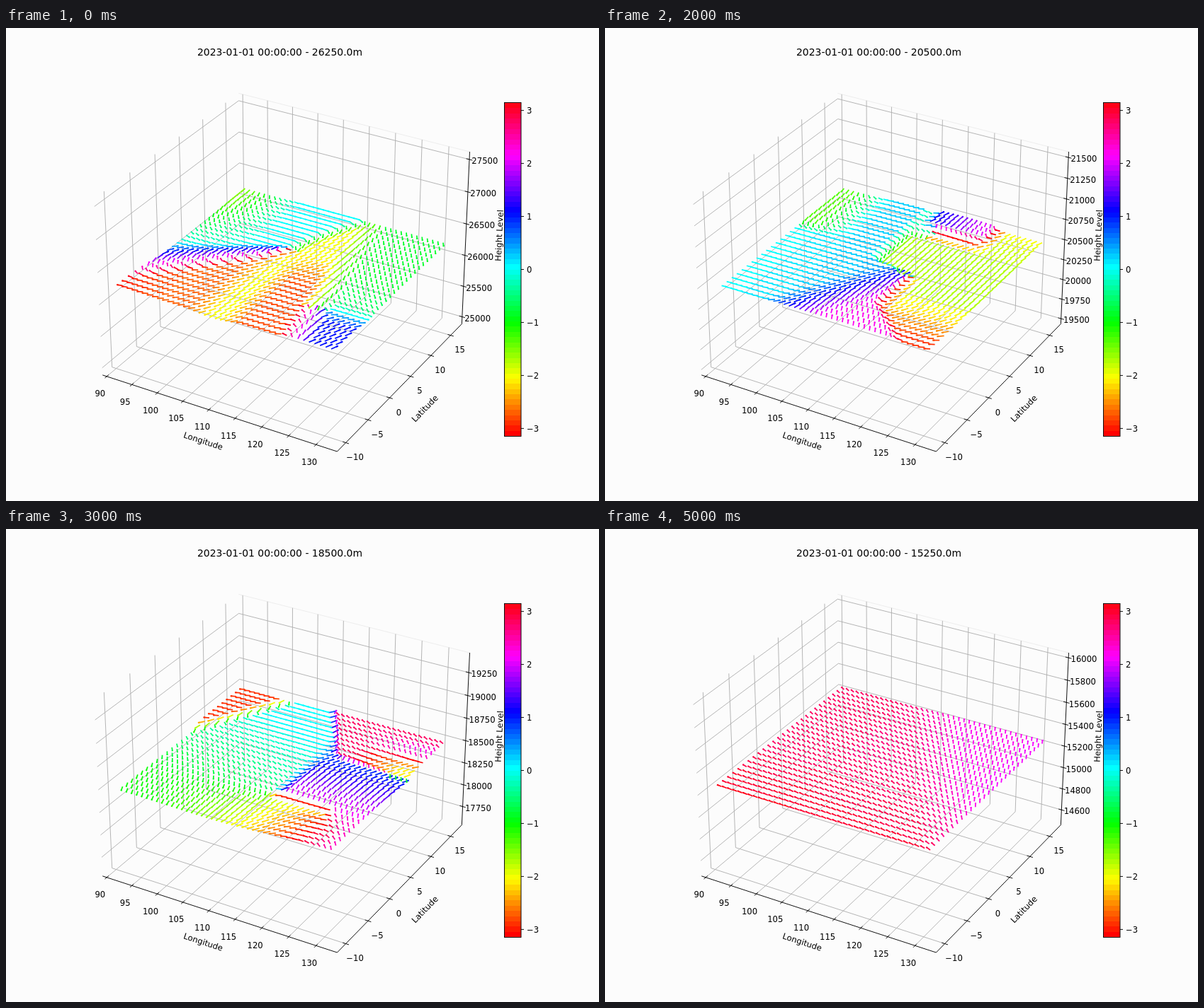
Recreate the animation shown at these times as an HTML page with a canvas. Size 837 px wide and 669 px high, loop 6000 ms.

```html
<!DOCTYPE html>
<html lang="en">
<head>
<meta charset="utf-8">
<title>Wind direction by height</title>
<style>
html, body { margin: 0; width: 100%; height: 100%; overflow: hidden; background: #fcfcfc; }
canvas { display: block; }
</style>
</head>
<body>
<canvas id="view" width="837" height="669"></canvas>
<script>
const ctx = document.getElementById('view').getContext('2d');
const FONT = '"DejaVu Sans", sans-serif';
const GRID = '#b0b0b0', INK = '#000', THIN = 0.93, SIZE = 11.62;

// Box half sizes, perspective scale and screen centre
const A = 0.5952, B = 0.4464, K = 3187, CX = 394.5, CY = 333.5;
// Data range and the share of it that the padded axes cover
const LON = [92, 131], LAT = [-10, 16], PAD = 1.1 * 25 / 24;

const ramp = (x, lo, hi) => Math.min(1, Math.max(0, (x - lo) / (hi - lo)));
const fall = (x, lo, hi) => 1 - ramp(x, lo, hi);
const mix = (a, b, k) => a + (b - a) * k;
const bump = (x, y) => Math.exp(-x * x - y * y);
// Blend two bearings along the shorter arc
const turn = (a, b, k) => a + k * Math.atan2(Math.sin(b - a), Math.cos(b - a));

// Bearing in radians at s (west to east) and t (south to north), both 0 to 1
function wind26(s, t) {
  const north = -1.5 * ramp(t, 0.42, 0.9) * fall(s, 0.02, 0.27);
  const south = 3.3 + 0.3 * ramp(s, 0, 0.25);
  const reach = Math.max(0.05, 0.33 - 0.55 * s);
  const west = mix(south, north, ramp(t - 0.38 - 0.5 * s, -reach, 0.06));
  const split = 0.4 + 0.22 * t ** 3;
  let a = turn(west, -2.05, ramp(s, split - 0.05, split + 0.05));
  a = turn(a, -2.8, ramp(s, 0.5, 0.6) * fall(t, 0.4, 0.65));
  const east = mix(1.05, -0.55, ramp(t, 0.15, 0.35)) - 0.3 * ramp(t, 0.3, 0.6);
  const edge = 0.83 - 0.17 * t;
  return turn(a, east, ramp(s, edge - 0.06, edge + 0.06));
}

function wind23(s, t) {
  const limit = 0.1 + 0.5 * s;
  const blue = 1.05 * ramp(s, -0.1, 0.15) * fall(t, limit - 0.1, limit) * fall(s, 0.38, 0.43);
  const green = -0.95 * bump((s - 0.6) / 0.27, 0) * fall(t, 0.8, 1);
  const front = (2.2 - 3.2 * (s - 0.42)) * fall(t, 0, 0.16) * ramp(s, 0.39, 0.43) * fall(s, 0.9, 1);
  const corners = 0.5 * fall(s, 0.05, 0.3) * ramp(t, 0.65, 0.9)
    + 0.4 * ramp(s, 0.75, 0.95) * ramp(t, 0.55, 0.85) + 0.15 * ramp(s, 0.85, 1);
  return 0.02 + blue + green - front + corners;
}

function wind20(s, t) {
  const west = 0.05 + 0.25 * ramp(s, 0, 0.4) + 1.9 * ramp(s - 0.6 * t, 0.19, 0.5)
    - 1.4 * ramp(t, 0.58, 0.68) * fall(s, 0.05, 0.22);
  const east = mix(-2.85, -1.7, ramp(t, 0.05, 0.4)) - 0.3 * ramp(t, 0.75, 1);
  const split = 0.85 - 0.19 * ramp(t, 0, 0.2) - 0.22 * ramp(t, 0.46, 0.54);
  const a = turn(west, east, ramp(s, split - 0.05, split + 0.05));
  const lobe = ramp(t, 0.78, 0.92) * ramp(s, 0.42, 0.48) * fall(s, 0.76, 0.84);
  return turn(a, 1 + 3.6 * (s - 0.45), lobe);
}

function wind18(s, t) {
  const west = ramp(t + 0.4 * s, 0.2, 0.9) - 1 - 3.2 * s * s * fall(t, 0.2, 0.32);
  let a = turn(west, -2.9, ramp(t - 1.8 * s, 0.54, 0.68));
  const east = 2.4 - 1.6 * ramp(t, 0.2, 0.65);
  a = turn(a, east, ramp(s, 0.54, 0.62) * ramp(t + 1.2 * Math.max(0, s - 0.85), 0.22, 0.3));
  const north = 2.75 + 1.4 * ramp(s, 0.7, 0.95) * fall(t, 0.74, 0.86)
    - 0.6 * ramp(s, 0.7, 0.9) * ramp(t, 0.78, 0.86) * fall(t, 0.88, 0.97);
  return turn(a, north, ramp(s + 0.6 * t, 1.02, 1.08) * ramp(t, 0.62, 0.68));
}

function wind16(s, t) {
  return 2.8 + 0.5 * fall(t, 0.05, 0.75)
    + 0.85 * fall(s, 0.1, 0.65) * fall(t, 0.4, 0.62)
    + 0.6 * bump((s - 0.06) / 0.1, (t - 0.46) / 0.09)
    - 1.3 * bump((s - 0.33) / 0.14, (t - 0.92) / 0.2);
}

function wind15(s, t) {
  return 3.05 - 0.3 * ramp(t, 0, 0.5) - 0.1 * ramp(s, 0.3, 1) - 0.5 * ramp(s + 0.6 * t, 0.95, 1.2);
}

const levels = [
  { z: 26250, step: 500, wind: wind26 },
  { z: 23750, step: 500, wind: wind23 },
  { z: 20500, step: 250, wind: wind20 },
  { z: 18500, step: 250, wind: wind18 },
  { z: 16500, step: 200, wind: wind16 },
  { z: 15250, step: 200, wind: wind15 }
];

function project(x, y, z) {
  const d = 10 - 0.433 * x + 0.75 * y - 0.5 * z;
  return [CX + K * (0.866 * x + 0.5 * y) / d,
          CY - K * (-0.25 * x + 0.433 * y + 0.866 * z) / d];
}

const scale = (v, [lo, hi]) => A * (2 * v - lo - hi) / ((hi - lo) * PAD);
const lonX = v => scale(v, LON);
const latY = v => scale(v, LAT);

function line(color, width, ...pts) {
  ctx.strokeStyle = color;
  ctx.lineWidth = width;
  ctx.beginPath();
  pts.forEach(p => ctx.lineTo(p[0], p[1]));
  ctx.stroke();
}

function text(str, x, y, { size = SIZE, align = 'center', angle = 0 } = {}) {
  ctx.save();
  ctx.translate(x, y);
  ctx.rotate(angle * Math.PI / 180);
  ctx.font = `${size}px ${FONT}`;
  ctx.textAlign = align;
  ctx.fillStyle = INK;
  ctx.fillText(str, 0, size * 0.365);
  ctx.restore();
}

const minus = n => String(n).replace('-', '\u2212');

function range(lo, hi, step) {
  const out = [];
  for (let v = Math.ceil(lo / step) * step; v <= hi; v += step) out.push(v);
  return out;
}

function hue(f) {
  const k = Math.min(63, Math.floor(f * 64));
  return `hsl(${k / 63 * 354.4}, 100%, 50%)`;
}

function tickMark(a, b, label, dx, dy) {
  line(INK, THIN, a, b);
  text(minus(label), (a[0] + b[0]) / 2 + dx, (a[1] + b[1]) / 2 + dy);
}

function drawBox({ z: mid, step }) {
  const T = 0.015;
  const lons = range(90, 130, 5), lats = range(-10, 15, 5);
  const heights = range(mid * 0.95, mid * 1.05, step);
  const boxZ = v => 2 * B * (v / mid - 1) / (0.1 * 25 / 24);

  line('#ececec', THIN, project(-A, A, B), project(A, A, B));
  for (const x of lons.map(lonX))
    line(GRID, THIN, project(x, -A, -B), project(x, A, -B), project(x, A, B));
  for (const y of lats.map(latY))
    line(GRID, THIN, project(A, y, -B), project(-A, y, -B), project(-A, y, B));
  for (const z of heights.map(boxZ))
    line(GRID, THIN, project(-A, -A, z), project(-A, A, z), project(A, A, z));

  line(INK, THIN, project(-A, -A, -B), project(A, -A, -B), project(A, A, -B), project(A, A, B));
  for (const v of lons) {
    const x = lonX(v);
    tickMark(project(x, -A - T, -B), project(x, -A + T, -B), v, -9.4, 24.3);
  }
  for (const v of lats) {
    const y = latY(v);
    tickMark(project(A - T, y, -B), project(A + T, y, -B), v, 13, 20.3);
  }
  for (const v of heights) {
    const z = boxZ(v);
    tickMark(project(A - T, A, z), project(A + T, A, z), v, 21.8, 2);
  }
  text('Longitude', 278.5, 584, { angle: 18.2 });
  text('Latitude', 591, 538, { angle: -45.8 });
  text('Height Level', 696, 293.5, { angle: -87.4 });
}

function drawWind({ wind }) {
  for (let lat = LAT[0]; lat <= LAT[1]; lat++) {
    for (let lon = LON[0]; lon <= LON[1]; lon++) {
      const a = wind((lon - LON[0]) / 39, (lat - LAT[0]) / 26);
      const at = r => project(lonX(lon + r * Math.cos(a)), latY(lat + r * Math.sin(a)), 0);
      const turns = a / (2 * Math.PI) + 0.5;
      const color = hue(turns - Math.floor(turns));
      line(color, 1.75, at(0), at(1));
      line(color, 2.1, at(0.7), at(1));
    }
  }
}

function drawBar() {
  const x = 703.5, y = 106, w = 23.5, h = 471;
  for (let k = 0; k < 64; k++) {
    ctx.fillStyle = hue((k + 0.5) / 64);
    const top = Math.round(y + h * (1 - (k + 1) / 64));
    ctx.fillRect(x, top, w, Math.round(y + h * (1 - k / 64)) - top);
  }
  ctx.strokeStyle = INK;
  ctx.lineWidth = THIN;
  ctx.strokeRect(x, y - 0.5, w, h + 1);
  for (let v = -3; v <= 3; v++) {
    const ty = 341.5 - v * h / (2 * Math.PI);
    line(INK, THIN, [727, ty], [731, ty]);
    text(minus(v), 735, ty + 0.3, { align: 'left' });
  }
}

function draw(level) {
  ctx.fillStyle = '#fcfcfc';
  ctx.fillRect(0, 0, 837, 669);
  drawBox(level);
  drawWind(level);
  drawBar();
  text(`2023-01-01 00:00:00 - ${level.z}.0m`, 386.5, 34.3, { size: 13.95 });
}

let shown = -1;
const start = performance.now();
function tick() {
  const i = Math.floor((performance.now() - start) / 1000) % levels.length;
  if (i !== shown) draw(levels[shown = i]);
  requestAnimationFrame(tick);
}
tick();
</script>
</body>
</html>
```
